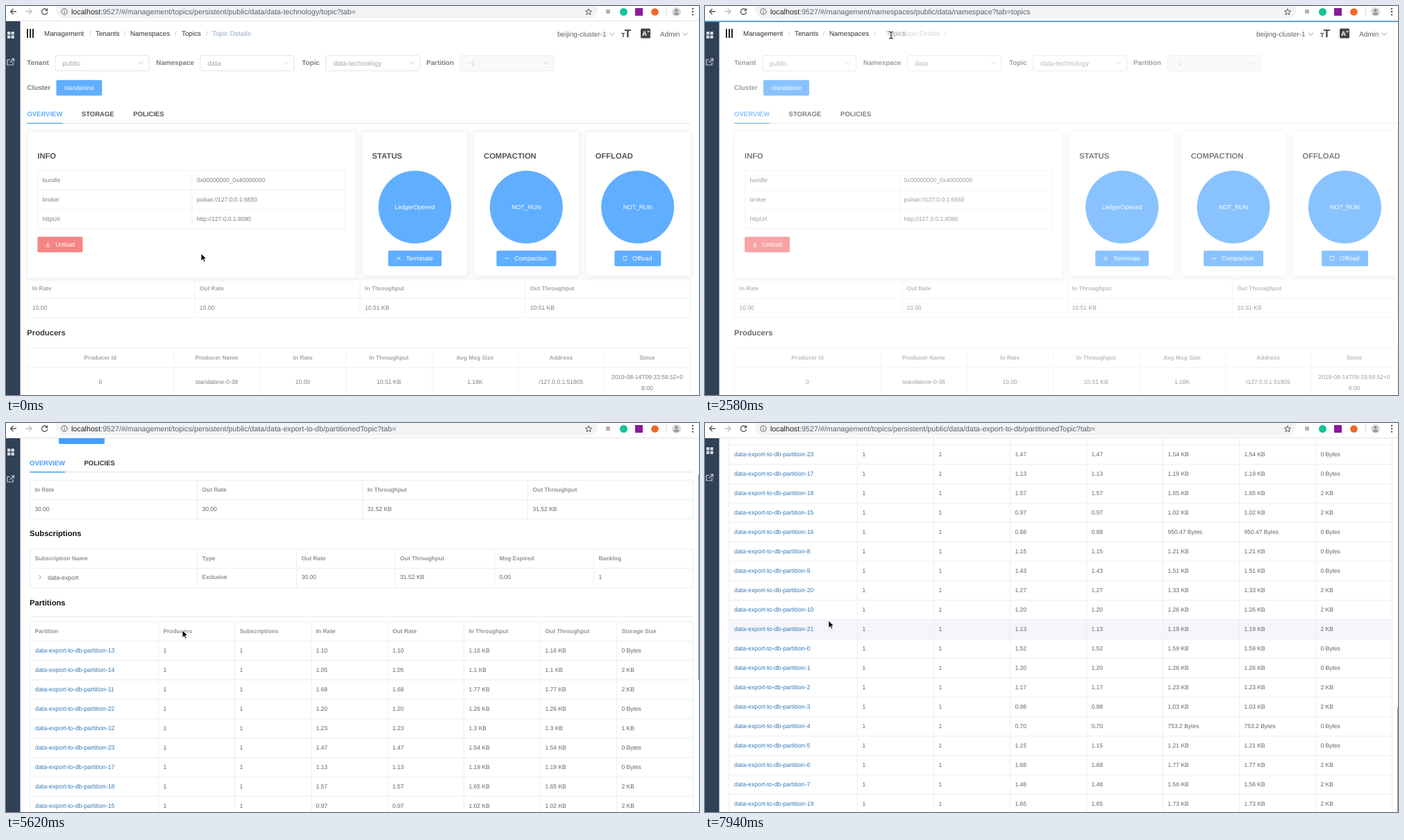
Animation of 998 by 561 pixels, one loop 8 s. Source, as an HTML page with a canvas:

```html
<!DOCTYPE html>
<html lang="en">
<head>
<meta charset="utf-8">
<title>Topic manager</title>
<style>
html, body { margin: 0; width: 100%; height: 100%; overflow: hidden; background: #fff; }
canvas { display: block; width: 998px; height: 561px; }
</style>
</head>
<body>
<canvas id="stage"></canvas>
<script>
const W = 998, H = 561, LOOP = 8000, BAR = 22;
const canvas = document.getElementById('stage');
const ctx = canvas.getContext('2d');
const dpr = window.devicePixelRatio || 1;
canvas.width = W * dpr;
canvas.height = H * dpr;
ctx.textRendering = 'geometricPrecision';

const BLUE = '#409eff', RED = '#f56c6c', INK = '#303133', BODY = '#606266',
      MUTED = '#909399', PALE = '#c0c4cc', LINE = '#ebeef5', LINK = '#337ab7';

const bursts = [[150, 290, 2], [590, 1530, 7], [1710, 2730, 8], [2870, 3800, 7], [3940, 3940, 1],
  [4240, 4680, 4], [5000, 5290, 3], [5620, 6060, 4], [6360, 7270, 7], [7440, 7940, 4]];

const cursorPath = [[0, 281, 357], [1850, 281, 357], [2400, 268, 42], [3000, 268, 42], [3800, 200, 85],
  [3940, 106, 247], [4240, 106, 247], [4680, 254, 299], [5700, 254, 299], [6060, 48, 220],
  [6360, 48, 220], [6660, 178, 285]];
const scrollPath = [[500, 0], [1100, 72], [1450, 72], [1850, 0], [5500, 0], [5620, 99], [6500, 99],
  [6815, 217], [7270, 640], [7400, 640], [7600, 1000], [7770, 1190], [7940, 1211]];

// id, rate, throughput, storage
const partitions = `13 1.10 1.16 0,14 1.05 1.1 2,11 1.68 1.77 2,22 1.20 1.26 0,12 1.23 1.3 1,23 1.47 1.54 0,
17 1.13 1.19 0,18 1.57 1.65 2,15 0.97 1.02 2,16 0.88 950.47 0,8 1.15 1.21 0,9 1.43 1.51 0,20 1.27 1.33 2,
10 1.20 1.26 2,21 1.13 1.19 2,0 1.52 1.59 0,1 1.20 1.26 0,2 1.17 1.23 2,3 0.98 1.03 2,4 0.70 753.2 0,
5 1.15 1.21 0,6 1.68 1.77 2,7 1.48 1.56 2,19 1.65 1.73 2`.split(',').map(row => {
  const [id, rate, size, stored] = row.trim().split(' ');
  return { name: 'data-export-to-db-partition-' + id, rate,
    size: size + (size > 99 ? ' Bytes' : ' KB'), stored: stored + (stored > 0 ? ' KB' : ' Bytes') };
});

const clamp = v => Math.min(1, Math.max(0, v));

function playhead(t) {
  let shown = 0;
  for (const [a, b, n] of bursts)
    for (let i = 0; i < n; i++) {
      const at = a + (b - a) * i / (n - 1 || 1);
      if (at - (i && i < n - 1 ? 20 : 0) <= t) shown = at;
    }
  return shown;
}

function along(path, t) {
  const i = path.findIndex(k => k[0] > t);
  if (i < 0) return path[path.length - 1].slice(1);
  if (!i) return path[0].slice(1);
  const [a, b] = [path[i - 1], path[i]], p = (t - a[0]) / (b[0] - a[0]);
  return a.slice(1).map((v, k) => v + (b[k + 1] - v) * p);
}

// CSS "ease"
function ease(x) {
  x = clamp(x);
  let lo = 0, hi = 1, u;
  for (let i = 0; i < 14; i++) {
    u = (lo + hi) / 2;
    if (.75 * u * (1 - u) + u ** 3 < x) lo = u; else hi = u;
  }
  return .3 * u * (1 - u) ** 2 + 3 * u * u * (1 - u) + u ** 3;
}

function text(s, x, y, { size = 8.5, color = BODY, bold = false, align = 'left' } = {}) {
  ctx.font = `${bold ? 'bold ' : ''}${size}px "Liberation Sans", Arial, sans-serif`;
  ctx.fillStyle = color;
  ctx.textAlign = align;
  ctx.fillText(s, x, y + size * .35);
  return ctx.measureText(s).width;
}
const heading = (s, x, y, color = INK) => text(s, x, y, { size: 11.2, bold: true, color });
const head = (s, x, y, align) => text(s, x, y, { size: 8.4, bold: true, color: MUTED, align });
const link = (s, x, y, color = LINK) => text(s, x, y, { size: 8.8, color });

function rect(x, y, w, h, color) {
  ctx.fillStyle = color;
  ctx.fillRect(x, y, w, h);
}
function round(x, y, w, h, r, fill, stroke) {
  ctx.beginPath();
  ctx.roundRect(x, y, w, h, r);
  if (fill) { ctx.fillStyle = fill; ctx.fill(); }
  if (stroke) { ctx.strokeStyle = stroke; ctx.lineWidth = 1; ctx.stroke(); }
}
function disc(x, y, r, color) {
  ctx.fillStyle = color;
  ctx.beginPath();
  ctx.arc(x, y, r, 0, 7);
  ctx.fill();
}
function icon(d, x, y, color, width = 1, fill) {
  ctx.save();
  ctx.translate(x, y);
  const path = new Path2D(d);
  if (fill) { ctx.fillStyle = fill; ctx.fill(path); }
  ctx.strokeStyle = color;
  ctx.lineWidth = width;
  ctx.stroke(path);
  ctx.restore();
}
const DOWN = 'M-3 3H3M0 -3V1.5M-2 -.5L0 1.5L2 -.5', UP = 'M-3 3H3M0 2V-2.5M-2 -.5L0 -2.5L2 -.5',
      CARET = 'M-3.5 -1.7L0 1.7L3.5 -1.7', RIGHT = 'M-1.5 -3L1.5 0L-1.5 3',
      CROSS = 'M-2.3 -2.3L2.3 2.3M2.3 -2.3L-2.3 2.3', MINUS = 'M-3 0H3', PLUS = 'M-3 0H3M0 -3V3',
      CYCLE = 'M-2.8 -.4A2.8 2.8 0 0 1 2.4 -1.6V-3M2.8 .4A2.8 2.8 0 0 1 -2.4 1.6V3';

// Bordered table; cols are the x of all vertical lines
function grid(cols, y, heights) {
  const x = cols[0], w = cols[cols.length - 1] - x, h = heights.reduce((a, b) => a + b);
  cols.forEach(c => rect(c, y, 1, h, LINE));
  rect(x, y, w, 1, LINE);
  for (const step of heights) rect(x, Math.round(y += step), w + 1, 1, LINE);
}
const leftCells = (cols, cells, y, draw = text) => cells.forEach((s, i) => s && draw(s, cols[i] + 7.5, y));
const midCells = (cols, cells, y, draw) =>
  cells.forEach((s, i) => draw(s, (cols[i] + cols[i + 1]) / 2, y, 'center'));

function button(s, x, y, w, color, glyph) {
  round(x, y - .2, w, 22.4, 2, color);
  if (glyph) icon(glyph, x + 15, y + 11, '#fff', .9);
  text(s, glyph ? x + 26 : x + w / 2, y + 11, { size: 8.8, color: '#fff', align: glyph ? 'left' : 'center' });
}

function select(label, value, labelX, x, disabled) {
  text(label, labelX, 82, { size: 9.8, bold: true });
  round(x + .5, 71.5, 135, 22, 3, disabled ? '#f5f7fa' : '#fff', disabled ? '#e4e7ed' : '#dcdfe6');
  text(value, x + 11, 82.5, { size: 9.8, color: disabled ? PALE : MUTED });
  icon(CARET, x + 124, 82.5, PALE);
}
function selects(topic) {
  select('Tenant', 'public', 34, 74);
  select('Namespace', 'data', 220, 283);
  if (topic) select('Topic', topic, 430, 464);
}
function tabs(y, names, active) {
  rect(34, y + 12.5, 955, 1.4, '#e4e7ed');
  for (const [s, x] of names) {
    const w = text(s, x, y, { size: 9.5, bold: true, color: s === active ? BLUE : INK });
    if (s === active) rect(x, y + 12.5, w, 1.4, BLUE);
  }
}
function cluster() {
  text('Cluster', 34, 118, { size: 9.8, bold: true });
  button('standalone', 76, 107, 66, BLUE);
}

const rateCols = [34, 275, 513, 751, 989], subCols = [34, 275, 418, 560, 703, 846, 989];
const rateHead = ['In Rate', 'Out Rate', 'In Throughput', 'Out Throughput'];
const subHead = ['Subscription Name', 'Type', 'Out Rate', 'Out Throughput', 'Msg Expired', 'Backlog'];

function rates(y, rate, size) {
  grid(rateCols, y, [28, 28]);
  leftCells(rateCols, rateHead, y + 14.5, head);
  leftCells(rateCols, [rate, rate, size, size], y + 42);
}

function topicPage() {
  selects('data-technology');
  select('Partition', '−1', 609, 657, true);
  cluster();
  tabs(156, [['OVERVIEW', 34], ['STORAGE', 112.5], ['POLICIES', 187]], 'OVERVIEW');

  const card = (x, w, h) => {
    ctx.shadowColor = 'rgba(0,0,0,.1)';
    ctx.shadowBlur = 8 * dpr;
    ctx.shadowOffsetY = 1.4 * dpr;
    round(x, 180.5, w, h, 2, '#fff');
    ctx.shadowColor = 'transparent';
    round(x, 180.5, w, h, 2, null, LINE);
  };
  card(34.5, 473, 212);
  heading('INFO', 49, 216);
  const info = [49, 271, 492];
  grid(info, 237, [28, 28, 28]);
  [['bundle', '0x00000000_0x40000000'], ['broker', 'pulsar://127.0.0.1:6650'], ['httpUrl', 'http://127.0.0.1:8080']]
    .forEach((row, i) => leftCells(info, row, 251.5 + 28 * i));
  button('Unload', 49, 333, 65, RED, DOWN);

  [['STATUS', 'LedgerOpened', 'Terminate', 554, 77, CROSS], ['COMPACTION', 'NOT_RUN', 'Compaction', 710, 86, MINUS],
   ['OFFLOAD', 'NOT_RUN', 'Offload', 880, 67, CYCLE]].forEach(([title, state, action, x, w, glyph], i) => {
    const left = 516.5 + 160.7 * i, mid = 592.5 + 160.4 * i;
    card(left, 152, 209);
    heading(title, left + 14.5, 216);
    disc(mid, 290, 52.5, BLUE);
    text(state, mid, 290, { size: 8.7, color: '#fff', align: 'center' });
    button(action, x, 353, w, BLUE, glyph);
  });

  rates(393, '10.00', '10.51 KB');
  heading('Producers', 34, 471.5, '#111');
  const cols = [34, 245, 369, 493, 617, 741, 865, 989];
  grid(cols, 493, [28, 44]);
  midCells(cols, ['Producer Id', 'Producer Name', 'In Rate', 'In Throughput', 'Avg Msg Size', 'Address', 'Since'], 507.5, head);
  const centred = (s, x, y) => text(s, x, y, { align: 'center' });
  midCells(cols, ['0', 'standalone-0-38', '10.00', '10.51 KB', '1.18K', '/127.0.0.1:51805', ''], 542.5, centred);
  centred('2019-08-14T09:33:58.52+0', 927, 535);
  centred('8:00', 927, 551);
  heading('Subscriptions', 34, 587, '#111');
  grid(subCols, 608, [28, 28]);
  midCells(subCols, subHead, 622.5, head);
}

function namespacePage(hovered) {
  selects();
  tabs(120.5, [['OVERVIEW', 34], ['TOPICS', 113], ['POLICIES', 177]], 'TOPICS');
  round(34.5, 145.5, 140, 21, 2, '#fff', '#dcdfe6');
  text('Search Topics', 45, 156, { size: 9.6, color: PALE });
  round(177, 145, 31, 22, 2, BLUE);
  icon('M2.4 -.4A2.6 2.6 0 1 1 -2.8 -.4A2.6 2.6 0 1 1 2.4 -.4M1.7 1.7L3.2 3.2', 193, 156, '#fff', .9);
  round(218, 145, 77, 22, 2, BLUE);
  icon(PLUS, 234, 156, '#fff', .9);
  text('New Topic', 242, 156, { size: 9.2, color: '#fff' });

  const mid = i => 233.5 + 88.9 * i;
  head('Topic', 41, 192);
  ['Partitions', 'Domain', 'Producers', 'Subscriptions', 'In Rate', 'Out Rate', 'In Throughput', 'Out Throughput', 'Storage Size']
    .forEach((s, i) => head(s, mid(i), 192, 'center'));
  rect(34, 205, 956, 1, LINE);
  [['data-technology', '0', '1', '10.00', '10.51', '16'], ['data-export-to-db', '24', '24', '30.02', '31.52', '22'],
   ['data-import-from-db', '36', '36', '40.00', '42.02', '35']].forEach(([name, parts, users, rate, size, stored], i) => {
    const y = 219.5 + 28 * i, over = hovered(y - 14, 28);
    if (over) rect(34, y - 14, 956, 28, '#f4f6fb');
    rect(34, Math.round(y + 13.5), 956, 1, LINE);
    icon(RIGHT, 48, y - .5, MUTED);
    link(name, 57, y, over ? BLUE : LINK);
    [parts, 'persistent', users, users].forEach((s, k) => text(s, mid(k), y, { align: 'center' }));
    [rate, rate, size + ' KB', size + ' KB'].forEach((s, k) => {
      const w = text(s, mid(k + 4) + 5.5, y, { align: 'center' });
      icon(k % 2 ? UP : DOWN, mid(k + 4) + 5.5 - w / 2 - 6, y, BODY, .9);
    });
    text(stored + ' KB', mid(8), y, { align: 'center' });
  });
}

function partitionedPage(hovered, expanded) {
  selects('data-export-to-db');
  cluster();
  tabs(156.5, [['OVERVIEW', 34], ['POLICIES', 112.5]], 'OVERVIEW');
  rates(181, '30.00', '31.52 KB');

  const nested = expanded ? partitions : [], step = 28.7;
  heading('Subscriptions', 34, 258.5, '#111');
  grid(subCols, 280, [28, 28, ...nested.map(() => step)]);
  leftCells(subCols, subHead, 294.5, head);
  icon(expanded ? CARET : RIGHT, 49, 321.5, MUTED);
  text('data-export', 60, 321.5, { size: 8.8 });
  leftCells(subCols, ['', 'Exclusive', '30.00', '31.52 KB', '0.00', '1'], 321.5);
  nested.forEach((p, i) => {
    const y = 350 + step * i;
    link(p.name, 67, y);
    leftCells(subCols, ['', 'Exclusive', p.rate, p.size, '0.00', i === 4 ? '1' : '0'], y);
    for (const d of [-3, 0, 3]) disc(865.5, y + d, 1, BODY);
  });

  const offset = Math.round(nested.length * step), cols = [34, 219, 329, 439, 549, 659, 769, 879, 989];
  ctx.translate(0, offset);
  heading('Partitions', 34, 358, '#111');
  rect(34, 378, 955, 1, LINE);
  partitions.forEach((p, i) => {
    const y = 413 + 28 * i;
    if (hovered(y + offset, 28)) rect(34, y, 955, 28, '#f4f6fb');
  });
  grid(cols, 385, [28, ...partitions.map(() => 28)]);
  leftCells(cols, ['Partition', 'Producers', 'Subscriptions', 'In Rate', 'Out Rate', 'In Throughput', 'Out Throughput', 'Storage Size'], 399.5, head);
  partitions.forEach((p, i) => {
    const y = 427 + 28 * i;
    link(p.name, 42, y);
    leftCells(cols, ['', '1', '1', p.rate, p.rate, p.size, p.size, p.stored], y);
  });
}

function breadcrumbs(t) {
  const crumb = (s, x, color = INK) => text(s, x, 39.5, { size: 9.8, color });
  const faded = (alpha, dx, draw) => {
    ctx.save();
    ctx.globalAlpha = clamp(alpha);
    ctx.translate(dx, 0);
    draw();
    ctx.restore();
  };
  const last = '#97a8be';
  crumb('Management', 55); crumb('Tenants', 129); crumb('Namespaces', 179);
  for (const x of [120, 169.5, 243]) crumb('/', x, PALE);
  const out = ease((t - 2490) / 500), back = ease((t - 4190) / 500);
  faded(t < 4190 ? 1 - 2 * out : 2 * back - 1, t < 4190 ? 30 * out : 20 * (1 - back), () => {
    const moving = t > 2490 && t < 4190;
    crumb('Topics', 253);
    crumb('/', moving ? 336 : 288, PALE);
    crumb('Topic Details', moving ? 275 : 297, last);
  });
  faded(t < 4190 ? 2 * out - 1 : 1 - 2 * back, t < 4190 ? 20 * (1 - out) : 30 * back,
    () => crumb('Namespace Details', 253, last));
}

function navbar(t) {
  for (const x of [30, 34, 38]) rect(x, 33, 1.8, 13, '#111');
  breadcrumbs(t);
  text('beijing-cluster-1', 794, 40, { size: 10 });
  icon(CARET, 872.5, 40.5, MUTED);
  text('T', 886, 42, { size: 9, bold: true, color: '#444' });
  text('T', 890.5, 39, { size: 16, bold: true, color: '#444' });
  round(914, 32.5, 14, 14, 1.5, '#444');
  text('A', 916, 40, { size: 9.5, bold: true, color: '#fff' });
  icon('M0 0H4M2 -1V0M.5 3L3.5 0', 923, 36.5, '#fff', .7);
  text('Admin', 942, 40, { size: 10 });
  icon(CARET, 978, 40.5, MUTED);
}

function browserBar(address) {
  rect(0, 0, W, BAR, '#fff');
  round(72, -8, 780, 26, 13, '#f1f3f4');
  rect(0, BAR - 1, W, 1, '#e3e3e5');
  icon('M4.5 0H-4M0 -4L-4 0L0 4', 10.5, 8, '#555', 1.3);
  icon('M-4.5 0H4M0 -4L4 0L0 4', 33, 8, '#bbb', 1.3);
  icon('M3.3 -2.4A4.1 4.1 0 1 0 4.1 .8M4 -4.5V-1.4H.9', 55.5, 8, '#555', 1.3);
  icon('M4.2 0A4.2 4.2 0 1 1 -4.2 0A4.2 4.2 0 1 1 4.2 0M0 -2.4V-1.3M0 -.4V2.4', 84, 8, '#5f6368');
  const w = text('localhost', 94, 8.5, { size: 10.7, color: '#202124' });
  text(':9527/#/management/' + address, 94 + w, 8.5, { size: 10.7, color: '#5f6368' });
  icon('M0 -4.6L1.3 -1.5L4.6 -1.3L2 .8L2.9 4L0 2.2L-2.9 4L-2 .8L-4.6 -1.3L-1.3 -1.5Z', 839, 8.5, '#555');
  rect(864, 5, 6, 6, '#b4b4b4');
  disc(889.5, 8.5, 5.5, '#15c39a');
  rect(906, 3, 11, 11, '#8a1a9b');
  disc(934.5, 8.5, 5.3, '#f0682a');
  rect(951, 2, 1, 13, '#ddd');
  disc(965.5, 8.5, 6.5, '#d5d7da');
  disc(965.5, 6.5, 2.2, '#8d9196');
  round(962, 9.7, 7, 3, 1.5, '#8d9196');
  for (const y of [4, 8.3, 12.6]) disc(989, y, 1.2, '#555');
}

function sidebar(lift) {
  rect(0, BAR, 20.5, H, '#304156');
  for (const [x, y] of [[2, 37], [7.5, 37], [2, 42.5], [7.5, 42.5]]) rect(x, y - lift, 4.3, 4.3, '#d4dae2');
  icon('M-.5 -3H-4.5V4.5H3.5V.5M1 -4.5H5V-.5M5 -4.5L-.5 1', 6.5, 80.5 - lift, '#c5ced9', 1.2);
}

function pointer(t, x, y) {
  if (t > 2400 && t < 2900)
    icon('M-3 -5Q0 -5 0 -3Q0 -5 3 -5M0 -4V4M-3 5Q0 5 0 3Q0 5 3 5', x, y, '#222', 1.1);
  else if ((t > 3900 && t < 4300) || (t > 6000 && t < 6360))
    icon('M-1 0Q0 -1.5 1 0V4L5 5Q6.3 5.5 6 7L5 11H-1L-4 7Q-4 5 -2.5 6L-1 7Z', x, y, '#222', 1, '#fff');
  else icon('M0 0V10.5L2.5 8.2L4.2 12L6 11.2L4.3 7.5H7.6Z', x, y, '#fff', .8, '#000');
}

function draw(now) {
  const t = playhead(now % LOOP);
  const [scroll] = along(scrollPath, t), [cx, cy] = along(cursorPath, t);
  const expanded = t >= 6360;
  const hovered = (y, h) => cx > 34 && cy + scroll >= y && cy + scroll < y + h;
  const [page, enter, leave, height] =
    t < 2990 ? [topicPage, -295, 2490, 642] :
    t < 4780 ? [namespacePage, 2990, 4190, 570] :
    [partitionedPage, 4780, Infinity, expanded ? 1780 : 1091];
  const dx = t < leave ? -30 * (1 - ease((t - enter) / 500)) : 30 * ease((t - leave) / 500);

  ctx.setTransform(dpr, 0, 0, dpr, 0, 0);
  rect(0, 0, W, H, '#fff');
  ctx.save();
  ctx.beginPath();
  ctx.rect(20, BAR, W - 20, H - BAR);
  ctx.clip();
  ctx.translate(0, -scroll);
  ctx.save();
  ctx.translate(dx, 0);
  page(hovered, expanded);
  ctx.restore();
  // A white veil fades the page as one layer
  rect(0, scroll, W, H, `rgba(255,255,255,${clamp(Math.abs(dx) / 30 * 1.4)})`);
  navbar(t);
  ctx.restore();

  sidebar(t > 7500 ? 2 : 0);
  browserBar(t < 2430 ? 'topics/persistent/public/data/data-technology/topic?tab=' :
    t < 4240 ? 'namespaces/public/data/namespace?tab=topics' :
    'topics/persistent/public/data/data-export-to-db/partitionedTopic?tab=');
  if ((t > 2430 && t < 2850) || (t > 4230 && t < 4500)) rect(0, BAR - .5, W, 1.6, '#3d94cf');
  if (scroll && (t < 1850 || (t > 5600 && t < 6000) || t > 7400)) {
    const view = 570;
    round(997, BAR + scroll / height * view, 3, view * view / height, 1, '#8f8f8f');
  }
  pointer(t, cx, cy);
}

function tick() {
  draw(performance.now());
  requestAnimationFrame(tick);
}
tick();
</script>
</body>
</html>
```
